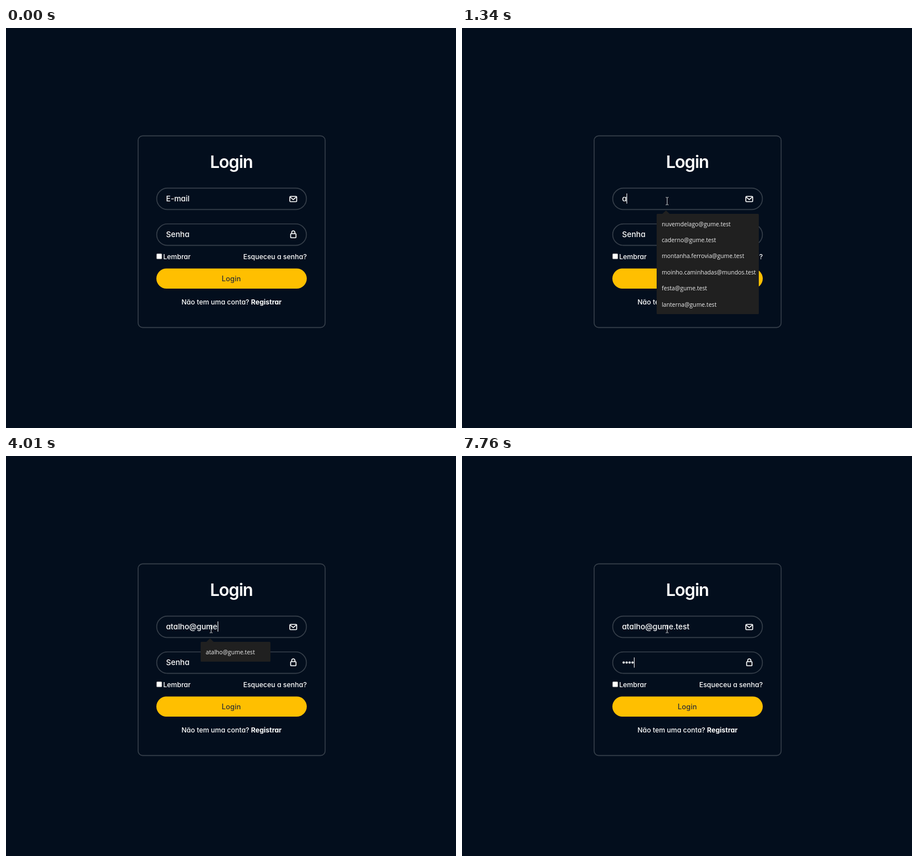
Write an HTML page that moves like this. It is 793x706 px and loops after 8 s.

```html
<!DOCTYPE html>
<html lang="pt">
<head>
<meta charset="utf-8">
<title>Login</title>
<style>
  html, body { margin: 0; width: 100%; height: 100%; overflow: hidden; background: #030e1d; }
  svg { display: block; }
  text { font: 500 12px Inter, "Open Sans", sans-serif; font-feature-settings: "cv11"; fill: #fff; }
  .title { font-size: 30px; font-weight: 600; letter-spacing: -1px; }
  .field { font-size: 13.5px; }
  .button { font-size: 12.8px; fill: #333; }
  .bold { font-weight: 700; }
  .border { fill: none; stroke: #363f4a; stroke-width: 1.6; }
  .icon { fill: none; stroke: #fff; stroke-width: 1.6; stroke-linejoin: round; }
  .popup { fill: #202020; }
  .popup text { font: 400 10.2px "Open Sans", "Noto Sans", sans-serif; fill: #eee; }
</style>
</head>
<body>
<svg width="793" height="706" viewBox="0 0 793 706">
  <rect class="border" x="232.8" y="190.4" width="329.6" height="338.2" rx="8"/>
  <text class="title" x="397" y="247" text-anchor="middle">Login</text>

  <rect class="border" x="265.6" y="282.6" width="263.8" height="37.8" rx="18.9"/>
  <text class="field" id="email" x="282" y="305.5"></text>
  <path class="icon" d="M501.5 297.3H511a1.3 1.3 0 0 1 1.3 1.3v6.6a1.3 1.3 0 0 1-1.3 1.3h-9.5a1.3 1.3 0 0 1-1.3-1.3v-6.6a1.3 1.3 0 0 1 1.3-1.3ZM501 298.5l5.2 4.3 5.2-4.3"/>

  <rect class="border" x="265.6" y="345.8" width="263.8" height="37.8" rx="18.9"/>
  <text class="field" id="hint" x="282" y="368.8">Senha</text>
  <g id="dots" fill="#fff"></g>
  <path class="icon" d="M502.4 363h7.8a.8.8 0 0 1 .8.8v5.6a.8.8 0 0 1-.8.8h-7.8a.8.8 0 0 1-.8-.8v-5.6a.8.8 0 0 1 .8-.8ZM503.5 363v-2.200a2.800 2.800 0 0 1 5.600 0v2.200"/>

  <rect x="265.300" y="398.300" width="9.400" height="9.400" rx="1.500" fill="#fff" stroke="#767676" stroke-width=".6"/>
  <text x="277" y="408">Lembrar</text>
  <text x="530" y="408" text-anchor="end">Esqueceu a senha?</text>
  <rect x="265" y="424.500" width="265" height="35.500" rx="17.750" fill="#ffbf00"/>
  <text class="button" x="397" y="446.600" text-anchor="middle">Login</text>
  <text x="397.500" y="487.500" text-anchor="middle">Não tem uma conta? <tspan class="bold">Registrar</tspan></text>

  <rect id="caret" width="1" height="18" fill="#fff"/>
  <g class="popup" id="fullList"></g>
  <g class="popup" id="match"></g>
  <path id="beam" d="M-2.500-6.500h2l.5.5.5-.5h2M0-6V6M-2.500 6.500h2l.5-.5.5.5h2" fill="none" stroke="#ccc"/>
  <path id="arrow" d="M0 0v13l3-2.800 2 4.600 2-.9-2-4.400h4.200Z" fill="#fff" stroke="#000" stroke-width=".8"/>
</svg>
<script>
const LOOP = 8000;
const ADDRESS = "atalho@gume.test";
const KEY_TIMES = [1340, 1740, 1880, 2010, 2210, 2340, 2810, 3550,
                   3750, 3880, 4010, 4210, 4410, 4540, 4680, 4880];
const DOT_TIMES = [6810, 7150, 7420, 7760];
const CARET_ON = [[670, 1200], [1340, 3410], [3550, 5740], [6280, LOOP]];
const SUGGESTIONS = ["nuvemdelago@gume.test", "caderno@gume.test", "montanha.ferrovia@gume.test",
                     "moinho.caminhadas@mundos.test", "festa@gume.test", "lanterna@gume.test"];

const [email, hint, dots, caret, fullList, match, beam, arrow] =
  ["email", "hint", "dots", "caret", "fullList", "match", "beam", "arrow"]
    .map(id => document.getElementById(id));

const within = (t, from, to) => t >= from && t < to;
const countPast = (times, t) => times.filter(time => t >= time).length;
const show = (node, visible) => node.setAttribute("visibility", visible ? "visible" : "hidden");

function buildPopup(group, width, height, rows) {
  group.innerHTML = `<rect x="343" y="328" width="${width}" height="${height}" rx="1.5"/>
    <path d="M352.500 328.500l7-6.500 7 6.500Z"/>` +
    rows.map((row, i) => `<text x="352" y="${349.6 + i * 28.4}">${row}</text>`).join("");
}

function drawPointer(t) {
  const step = Math.min(1, Math.max(0, Math.floor((t - 70) / 70) / 7));
  const eased = 1 - (1 - step) ** 2;
  const x = 372 - 10.5 * eased, y = 111 + 194.5 * eased;
  const overField = y > 282;
  for (const node of [beam, arrow]) node.setAttribute("transform", `translate(${x} ${y})`);
  show(beam, t >= 70 && overField);
  show(arrow, t >= 70 && !overField);
}

function render(t) {
  const typed = ADDRESS.slice(0, countPast(KEY_TIMES, t));
  const dotCount = countPast(DOT_TIMES, t);
  email.textContent = typed || "E-mail";
  show(hint, !dotCount);
  [...dots.children].forEach((dot, i) => show(dot, i < dotCount));

  const inPassword = t >= 5210;
  const typedWidth = typed ? email.getComputedTextLength() : 0;
  caret.setAttribute("x", Math.round(282 + (inPassword ? dotCount * 5.2 : typedWidth)));
  caret.setAttribute("y", inPassword ? 355.5 : 292);
  show(caret, CARET_ON.some(([from, to]) => within(t, from, to)));

  show(fullList, within(t, 670, 1410));
  show(match, within(t, 1410, 5080));
  drawPointer(t);
}

buildPopup(fullList, 180, 177, SUGGESTIONS);
buildPopup(match, 123, 35, [ADDRESS]);
dots.innerHTML = DOT_TIMES.map((_, i) =>
  `<circle cx="${284.9 + i * 5.2}" cy="364.5" r="2"/>`).join("");

function frame() {
  render(performance.now() % LOOP);
  requestAnimationFrame(frame);
}
frame();
</script>
</body>
</html>
```
